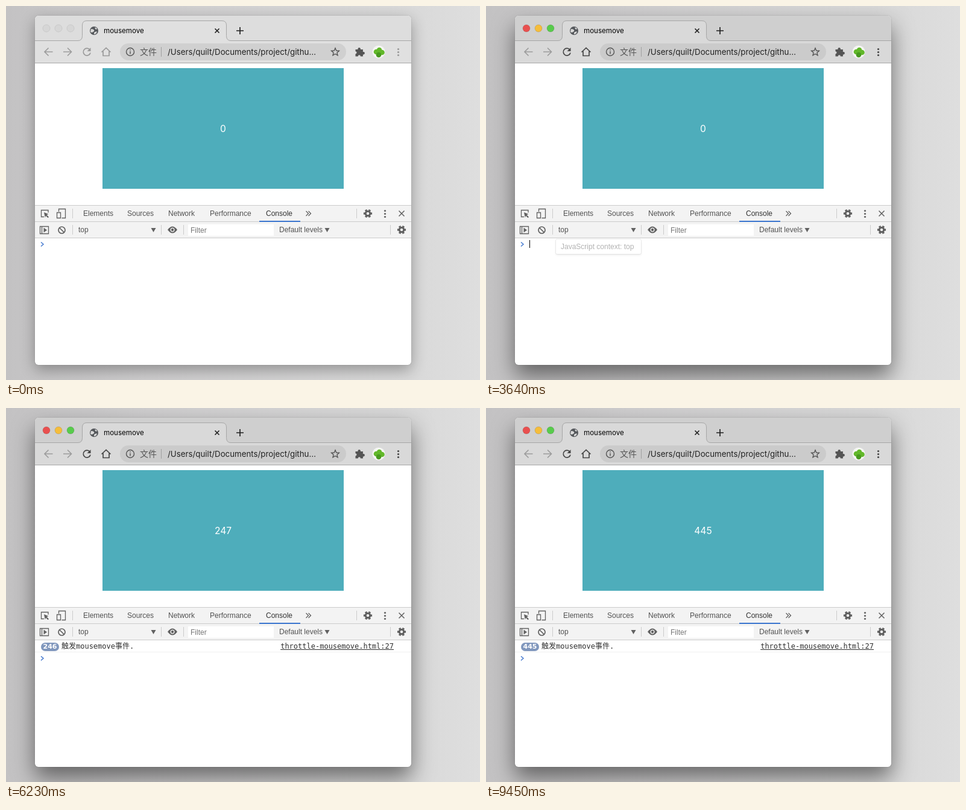
An HTML page that plays this animation: 786x620 px, repeating every 9520 ms.

```html
<!DOCTYPE html>
<html lang="zh">
<head>
<meta charset="utf-8">
<title>mousemove</title>
<style>
  html, body { margin: 0; width: 100%; height: 100%; overflow: hidden; }
  body {
    position: relative;
    background: linear-gradient(90deg, #c3c2c3, #cfcecf 30%, #d9d9d9 85%, #dedede);
  }
  .window {
    position: absolute; left: 48px; top: 16px; width: 624px; height: 579px;
    border-radius: 6px;
    box-shadow: 0 0 1px rgba(0, 0, 0, .5), 0 8px 24px rgba(0, 0, 0, .32);
    --strip: #dddddd; --bar: #e0e0e0; --pill: #d0d0d0; --icon: #9a9a9a;
  }
  .window.active {
    box-shadow: 0 0 1px rgba(0, 0, 0, .6), 0 18px 36px rgba(0, 0, 0, .5);
    --strip: #cfcfcf; --bar: #d9d9d9; --pill: #cbcbcb; --icon: #474747;
  }
  svg { position: absolute; left: 0; top: 0; display: block; }
  .strip { fill: var(--strip); }
  .bar { fill: var(--bar); }
  .pill { fill: var(--pill); }
  .line { fill: none; stroke-linecap: butt; }
  .dyn { stroke: var(--icon); }
  .dynfill { fill: var(--icon); }
  .lights { fill: #d6d6d6; stroke: #cacaca; }
  .active .lights { stroke: rgba(0, 0, 0, .12); }
  .active .red { fill: #e9504f; }
  .active .yellow { fill: #f5bd3b; }
  .active .green { fill: #58cb4c; }
  .ui { font: 11.6px Inter, Roboto, sans-serif; }
  .url { font: 13.3px Inter, Roboto, sans-serif; fill: #222; }
  .cjk { font: 14px "Noto Sans CJK SC", "Noto Sans CJK", sans-serif; fill: #555; }
  .tools { font: 12px "Liberation Sans", Arial, sans-serif; fill: #525252; }
  .count { font: 15.6px Inter, Roboto, sans-serif; fill: #fff; text-anchor: middle; }
  .log {
    position: absolute; left: 48px; top: 385px; width: 624px; height: 19px;
    border-bottom: 1px solid #f0f0f0;
    font: 12px/21px "DejaVu Sans Mono", "Noto Sans CJK SC", "Noto Sans CJK", monospace;
    color: #303030; white-space: nowrap;
  }
  .log span { position: absolute; top: 0; }
  .log .left { left: 10px; }
  .log .left span { position: static; }
  .log .badge {
    display: inline-block; height: 14px; padding: 0 3.5px; margin-right: 4px;
    border-radius: 7px; background: #8097bd; color: #fff;
    font: bold 11px/14px "DejaVu Sans", sans-serif; vertical-align: 0;
  }
  .log .link { right: 29px; text-decoration: underline; }
  .tip {
    position: absolute; left: 116px; top: 387px; width: 141px; height: 24px;
    border-radius: 2px; background: #fff; opacity: 0;
    box-shadow: 0 0 1px 1px rgba(0, 0, 0, .2), 0 2px 4px rgba(0, 0, 0, .2);
    font: 12px/24px "Liberation Sans", Arial, sans-serif; color: #333;
    text-indent: 8px; white-space: nowrap;
  }
</style>
</head>
<body>
<div class="window" id="win">
<svg width="624" height="579" viewBox="48 16 624 579">
  <defs>
    <clipPath id="frame"><rect x="48" y="16" width="624" height="579" rx="6"/></clipPath>
    <g id="gear" fill="none" stroke="#5f5f5f">
      <circle r="3.8" stroke-width="3"/>
      <circle r="6" stroke-width="2.2" pathLength="12" stroke-dasharray="1.1 .9" stroke-dashoffset=".55"/>
    </g>
    <g id="dots"><circle cy="-5" r="1.6"/><circle r="1.6"/><circle cy="5" r="1.6"/></g>
    <path id="down" d="M-4-3h8l-4 7z"/>
  </defs>
  <g clip-path="url(#frame)">
    <rect x="48" y="16" width="624" height="579" fill="#fff"/>
    <rect class="strip" x="48" y="16" width="624" height="42"/>
    <rect class="bar" x="48" y="58" width="624" height="37"/>
    <path class="bar" d="M119 58q8 0 8-8V32q0-7.500 7.500-7.500h223.500q7.500 0 7.500 7.500v18q0 8 8 8z"/>
    <path class="line" stroke="#a6a6a6" d="M48 57.500h71q7.500 0 7.500-8V32q0-7.500 7.500-7.500h224q7.500 0 7.500 7.500v17.500q0 8 7.500 8h299M48 94.500h624"/>

    <g class="lights">
      <circle class="red" cx="67" cy="37" r="6"/>
      <circle class="yellow" cx="87" cy="37" r="6"/>
      <circle class="green" cx="107" cy="37" r="6"/>
    </g>

    <!-- tab -->
    <circle cx="146" cy="41" r="7" fill="#55585c"/>
    <path d="M141 38q4 0 5 2t-2 3q-2 2-4-.500zM147 36q3-1 4 2l-2 1zM146 44l4-2q1.500 1-1 4l-3 1z" fill="#dadada"/>
    <text class="ui" x="162" y="45">mousemove</text>
    <path class="line" stroke="#222" stroke-width="1.700" d="M346.500 37.500l7 7m0-7l-7 7M382 41h12M388 35v12"/>

    <!-- address bar -->
    <g class="line" stroke="#9d9d9d" stroke-width="1.700">
      <path d="M77.500 76H64m6.500-6.500L64 76l6.500 6.500M95 76h13.500m-6.500-6.500l6.500 6.500-6.500 6.500"/>
      <g class="dyn">
        <path d="M139 72.500a6 6 0 1 0 1 5"/>
        <path d="M158.500 76.500l7.500-7 7.500 7M161 75v7.500h10V75"/>
      </g>
    </g>
    <path class="dynfill" d="M140.500 69v6h-6z"/>
    <rect class="pill" x="189" y="62" width="375" height="28" rx="14"/>
    <g class="line" stroke="#555" stroke-width="1.400">
      <circle cx="206" cy="76" r="6.500"/>
      <path d="M206 75v4.500M206 72v1.600"/>
      <path stroke="#a0a0a0" stroke-width="1" d="M257.500 68v16"/>
      <path d="M546 69.800l1.800 4.200 4.600.4-3.500 3 1.100 4.500-4-2.400-4 2.400 1.100-4.500-3.500-3 4.600-.4z"/>
    </g>
    <text class="cjk" x="222" y="81">文件</text>
    <text class="url" x="268" y="81">/Users/quilt/Documents/project/githu…</text>
    <path fill="#555" d="M579.500 72h4a2.300 2.300 0 1 1 4.400 0h4v4a2.300 2.300 0 1 1 0 4.400v3h-4a2.100 2.100 0 0 0-4.200 0h-4.200v-4a2.100 2.100 0 0 0 0-4.200z"/>
    <circle cx="618" cy="76" r="10.500" fill="#f5f6f3"/>
    <g fill="#62b82a">
      <circle cx="614" cy="76" r="4.300"/><circle cx="619" cy="73" r="4.300"/>
      <circle cx="623.500" cy="77" r="4.300"/><circle cx="618" cy="81" r="4.300" fill="#48991f"/>
    </g>
    <use href="#dots" class="dynfill" x="650.500" y="76.500"/>

    <!-- page -->
    <rect x="160" y="103" width="400" height="200" fill="#4eadbb"/>
    <text class="count" id="count" x="360" y="209">0</text>

    <!-- developer tools -->
    <rect x="48" y="330" width="624" height="55" fill="#f3f3f3"/>
    <path class="line" stroke="#cbcbcb" d="M48 330.500h624M48 357.500h624M48 384.500h624M110.500 336v16M581.500 336v16M110.500 363v16M257.500 363v16M294.500 363v16M637.500 363v16"/>
    <rect x="420" y="356" width="68" height="2" fill="#3b75cf"/>
    <rect x="302" y="362" width="142" height="19" fill="#fff"/>
    <g class="tools">
      <text x="128" y="348">Elements</text>
      <text x="201" y="348">Sources</text>
      <text x="269" y="348">Network</text>
      <text x="338" y="348">Performance</text>
      <text x="431" y="348" fill="#333">Console</text>
      <text x="120" y="375">top</text>
      <text x="306" y="376" fill="#757575">Filter</text>
      <text x="453" y="375">Default levels</text>
    </g>
    <g class="line" stroke="#616161" stroke-width="1.300">
      <path d="M63 349.500h-4.500v-11h11.500v4M497.500 340l4 4-4 4m4-8l4 4-4 4"/>
      <path d="M87.500 341v-4.500h11v15h-6M84.500 342.500h6v9h-6z"/>
      <path stroke-width="1.500" d="M651.500 339.500l9 9m0-9l-9 9"/>
      <path d="M56.500 365.500h14v12h-14zM59.500 365.500v12"/>
      <g stroke-width="1.700"><circle cx="92.500" cy="371.500" r="5.500"/><path d="M88.500 367.500l8 8"/></g>
    </g>
    <g fill="#616161">
      <path d="M63 342l7.500 3-3 1.200 3.500 3.500-1.500 1.500-3.500-3.500-1.200 3z"/>
      <path d="M62.500 367.500l5.500 4-5.500 4z"/>
      <path d="M268 371q8-11 16 0-8 11-16 0z"/>
      <circle cx="276" cy="371" r="3.500" fill="#f3f3f3"/><circle cx="276" cy="371" r="2.200"/>
      <use href="#dots" x="628.500" y="344.500"/>
      <use href="#down" x="244.500" y="371"/>
      <use href="#down" x="532.500" y="371"/>
    </g>
    <use href="#gear" x="600" y="344"/>
    <use href="#gear" x="656" y="371"/>

    <g id="prompt">
      <path class="line" stroke="#477bd0" stroke-width="1.500" d="M58 391.500l4 3.500-4 3.500"/>
      <rect id="caret" x="72" y="388" width="1" height="13" fill="#000"/>
    </g>
  </g>
</svg>
</div>
<div class="log" id="log">
  <span class="left"><span class="badge" id="badge"></span><span>触发mousemove事件.</span></span>
  <span class="link">throttle-mousemove.html:27</span>
</div>
<div class="tip" id="tip">JavaScript context: top</div>

<script>
  const LOOP = 9520, STEP = 70, FOCUS = 3430, BLINK = 530;
  const moves = [[3780, 0], [5390, 179], [5460, 179], [6930, 308], [7000, 308], [8050, 425], [8330, 445]];
  const fade = [[3500, 0], [3640, .37], [3710, .37], [3850, 0]];
  const el = id => document.getElementById(id);
  const [win, count, log, badge, tip, prompt, caret] =
    ['win', 'count', 'log', 'badge', 'tip', 'prompt', 'caret'].map(el);

  // Piecewise linear value at time t
  function along(points, t) {
    if (t <= points[0][0]) return points[0][1];
    for (let i = 1; i < points.length; i++) {
      const [t0, a] = points[i - 1], [t1, b] = points[i];
      if (t < t1) return a + (b - a) * (t - t0) / (t1 - t0);
    }
    return points[points.length - 1][1];
  }

  function draw(t) {
    const active = t >= FOCUS;
    const total = Math.round(along(moves, t));
    const logged = Math.round(along(moves, t - 10)); // the console trails the page slightly
    win.classList.toggle('active', active);
    count.textContent = total;
    log.style.display = logged ? 'block' : 'none';
    badge.style.display = logged > 1 ? 'inline-block' : 'none';
    badge.textContent = logged;
    prompt.setAttribute('transform', `translate(0 ${logged ? 20 : 0})`);
    caret.style.display = active && (t - FOCUS) % (2 * BLINK) < BLINK ? 'inline' : 'none';
    tip.style.opacity = along(fade, t);
  }

  const start = performance.now();
  function tick() {
    const t = (performance.now() - start) % LOOP;
    draw(Math.floor(t / STEP) * STEP);
    requestAnimationFrame(tick);
  }
  tick();
</script>
</body>
</html>
```
